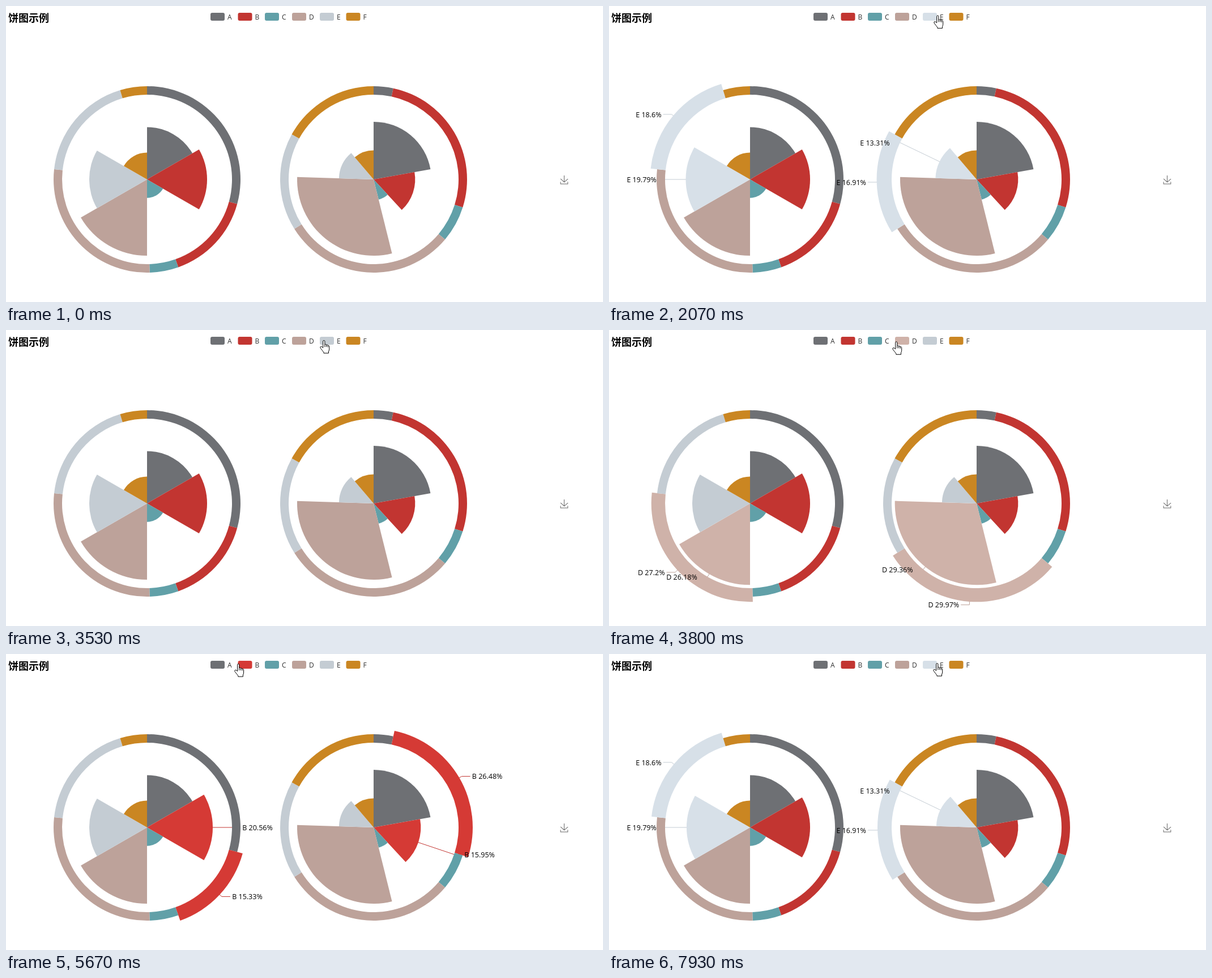
Write an HTML page that moves like this. It is 1054 px wide and 524 px high and loops after 8000 ms.

```html
<!DOCTYPE html>
<html lang="zh">
<head>
<meta charset="utf-8">
<title>饼图示例</title>
<style>
html, body { margin: 0; width: 100%; height: 100%; overflow: hidden; background: #fff; }
svg { display: block; width: 1054px; height: 524px; }
.title { font: bold 18px "Noto Sans CJK SC", "Noto Sans CJK", sans-serif; }
#legend text { font: 12px "Open Sans", "Noto Sans", sans-serif; }
#labels text { font: 12.5px "Open Sans", "Noto Sans", sans-serif; }
#lines path { fill: none; }
</style>
</head>
<body>
<svg viewBox="0 0 1054 524">
  <text class="title" x="4" y="28">饼图示例</text>
  <g id="legend"></g>
  <path transform="translate(977.9 300) scale(.2586)" fill="none" stroke="#666" stroke-width="3.87"
    d="M4.7 22.9L29.3 45.5L54.7 23.4M4.6 43.6V58H53.8V43.6M29.2 45.1V0"/>
  <g id="lines"></g>
  <g id="sectors"></g>
  <g id="labels"></g>
  <path id="cursor" fill="#fff" stroke="#000" stroke-linejoin="round"/>
</svg>
<script>
const LOOP = 8000, STEP = 1000 / 15, CY = 307;
const HIDE = 2320, SHOW = 3230, MOVE = 300;
const A = 0, B = 1, C = 2, D = 3, E = 4;
const names = 'ABCDEF';
const colors = [[110, 112, 116], [194, 53, 49], [97, 160, 168], [189, 162, 154], [196, 204, 211], [202, 134, 34]];
const legendX = [361, 409.5, 457, 505, 554, 600.5];

// shift: horizontal nudge of each label's elbow
const pies = [
  { cx: 249, rose: 'area', share: [17.94, 20.56, 6.33, 26.18, 19.79, 9.2], shift: [9, 0, 9, 0, 3, 0] },
  { cx: 249, share: [29.24, 15.33, 4.98, 27.2, 18.6, 4.65], shift: [0, 0, 31, 0, 0, 0] },
  { cx: 649, rose: 'radius', share: [22.19, 15.95, 7.99, 29.36, 13.31, 11.2], shift: [4, 0, 10, 0, 0, 0] },
  { cx: 649, share: [3.38, 26.48, 6.28, 29.97, 16.91, 16.98], shift: [41, 0, 0, 0, 3, 0] }
];

// item, start, end
const hovers = [
  [E, 2030, HIDE], [E, 3585, 3650], [D, 3690, 3808], [C, 3836, 4812], [B, 4869, 5676],
  [A, 5740, 5820], [A, 6262, 6924], [E, 7434, LOOP]
];

// time, x, y of the pointer tip
const track = [
  [0, 1018, 560], [724, 1018, 560], [725, 1018, 512], [1520, 705, -30], [1649, 705, -30],
  [1650, 690, 7], [2200, 561.5, 18], [3580, 561.5, 18], [3980, 467.5, 22], [4720, 467.5, 22],
  [5060, 423, 20], [5500, 423, 20], [5990, 376, 9], [6230, 376, 9], [6330, 375.5, 18],
  [6850, 375.5, 18], [7050, 420, 44], [7300, 540, 44], [7520, 580, 17], [7925, 580, 17],
  [7926, 579.5, 16], [LOOP, 579.5, 16]
];

const ARROW = 'M0 0V17L4 13.3L6.6 19.3L9.2 18.2L6.6 12.4H12Z';
const HAND = 'M-1.8 2.2Q-1.8 .5-.2 .5T1.4 2.2V8.2Q1.8 7.2 2.9 7.3T4.2 8.8Q4.6 7.9 5.6 8.1T6.8 9.6' +
  'Q7.3 8.9 8.2 9.3T9.2 11V16Q9.2 18 8 20V23H-.6V21.5Q-2.8 18.5-6 14.5Q-7.4 12.3-6 11.4T-1.8 13.4Z' +
  'M1.4 8.2V12M4.2 8.8V12M6.8 9.6V12.5';

const $ = id => document.getElementById(id);
const clamp = v => Math.max(0, Math.min(1, v));
const lerp = (a, b, k) => a + (b - a) * k;
const cubicOut = k => 1 - (1 - clamp(k)) ** 3;
const elasticOut = k => k <= 0 ? 0 : k >= 1 ? 1 : 1 + 2 ** (-10 * k) * Math.sin((k - .1) * 5 * Math.PI);
const rgb = (i, lit) => `rgb(${colors[i].map(c => Math.min(255, Math.floor(c * (lit ? 1.1 : 1))))})`;

function add(parent, tag, attrs = {}) {
  const el = document.createElementNS('http://www.w3.org/2000/svg', tag);
  set(el, attrs);
  return parent.appendChild(el);
}
function set(el, attrs) {
  for (const key in attrs) el.setAttribute(key, attrs[key]);
}

function polar(cx, r, turn) {
  const a = turn * 2 * Math.PI;
  return [cx + r * Math.sin(a), CY - r * Math.cos(a)];
}

// Start and end of every slice in turns, optionally without E
function slices(pie, skipE) {
  const size = pie.share.map((v, i) => skipE && i === E ? 0 : pie.rose === 'area' ? 1 : v);
  const sum = size.reduce((a, b) => a + b);
  let at = 0;
  return size.map(v => [at, at += v / sum]);
}

function sectorPath(cx, r0, r, from, to) {
  const big = to - from > .5 ? 1 : 0;
  const inner = r0 ? `L${polar(cx, r0, to)}A${r0} ${r0} 0 ${big} 0 ${polar(cx, r0, from)}` : `L${cx} ${CY}`;
  return `M${polar(cx, r, from)}A${r} ${r} 0 ${big} 1 ${polar(cx, r, to)}${inner}Z`;
}

const legend = [...names].map((name, i) => ({
  box: add($('legend'), 'rect', { x: legendX[i], y: 12, width: 25, height: 14, rx: 3 }),
  text: Object.assign(add($('legend'), 'text', { x: legendX[i] + 30, y: 24 }), { textContent: name })
}));

for (const pie of pies) {
  const max = Math.max(...pie.share);
  pie.r0 = pie.rose ? 0 : 150;
  pie.full = slices(pie, false);
  pie.less = slices(pie, true);
  pie.items = pie.share.map((share, i) => {
    const r = pie.rose ? 135 * share / max : 165;
    const mid = (pie.full[i][0] + pie.full[i][1]) / 2;
    const side = mid < .5 ? 1 : -1;
    const [x, y] = polar(pie.cx, pie.rose ? 150 : 180, mid);
    const elbow = x + pie.shift[i], end = elbow + side * 15;
    const line = add($('lines'), 'path', { d: `M${polar(pie.cx, r, mid)}L${elbow} ${y}H${end}`, stroke: rgb(i) });
    const label = add($('labels'), 'text', {
      x: end + side * 3.2, y: y + 4.8, 'text-anchor': side > 0 ? 'start' : 'end'
    });
    label.textContent = `${names[i]} ${share}%`;
    return { r, line, label, sector: add($('sectors'), 'path') };
  });
}

function lift(i, t) {
  let v = 0;
  for (const [item, on, off] of hovers) {
    if (item !== i || t < on) continue;
    v = lerp(v, 10, elasticOut((Math.min(t, off) - on) / MOVE));
    if (t >= off) v = lerp(v, 0, elasticOut((t - off) / MOVE));
  }
  return v;
}

function drawCursor(t) {
  const n = Math.max(1, track.findIndex(p => p[0] > t));
  const [t0, x0, y0] = track[n - 1], [t1, x1, y1] = track[n];
  const k = clamp((t - t0) / (t1 - t0)), s = k * k * (3 - 2 * k);
  const x = lerp(x0, x1, s), y = lerp(y0, y1, s);
  const onItem = y >= 12 && y <= 26 && legendX.some(l => x >= l && x <= l + 38);
  set($('cursor'), { d: onItem ? HAND : ARROW, transform: `translate(${x} ${y})` });
}

function draw(t) {
  const hidden = t >= HIDE && t < SHOW;
  const grow = t < SHOW ? 1 : cubicOut((t - SHOW) / MOVE);
  const close = t < SHOW ? cubicOut((t - HIDE) / MOVE) : 1 - grow;

  for (let i = 0; i < 6; i++) {
    const lit = hovers.some(([item, on, off]) => item === i && t >= on && t < off);
    const gone = i === E && hidden;
    const extra = lift(i, t);
    set(legend[i].box, { fill: gone ? '#ccc' : rgb(i, lit) });
    set(legend[i].text, { fill: gone ? '#ccc' : '#333' });

    for (const pie of pies) {
      const { r, line, label, sector } = pie.items[i];
      let [from, to] = pie.full[i];
      if (i === E) to = lerp(from, to, grow);
      else [from, to] = [0, 1].map(e => lerp(pie.full[i][e], pie.less[i][e], close));
      set(sector, {
        d: sectorPath(pie.cx, pie.r0, r + extra, from, to),
        fill: rgb(i, lit),
        visibility: gone ? 'hidden' : 'visible'
      });
      const visibility = lit ? 'visible' : 'hidden';
      set(line, { visibility });
      set(label, { visibility });
    }
  }
  drawCursor(t);
}

function tick() {
  const t = performance.now() % LOOP;
  draw(Math.min(LOOP - 1, Math.floor((t + 4) / STEP) * STEP));
  requestAnimationFrame(tick);
}
tick();
</script>
</body>
</html>
```
